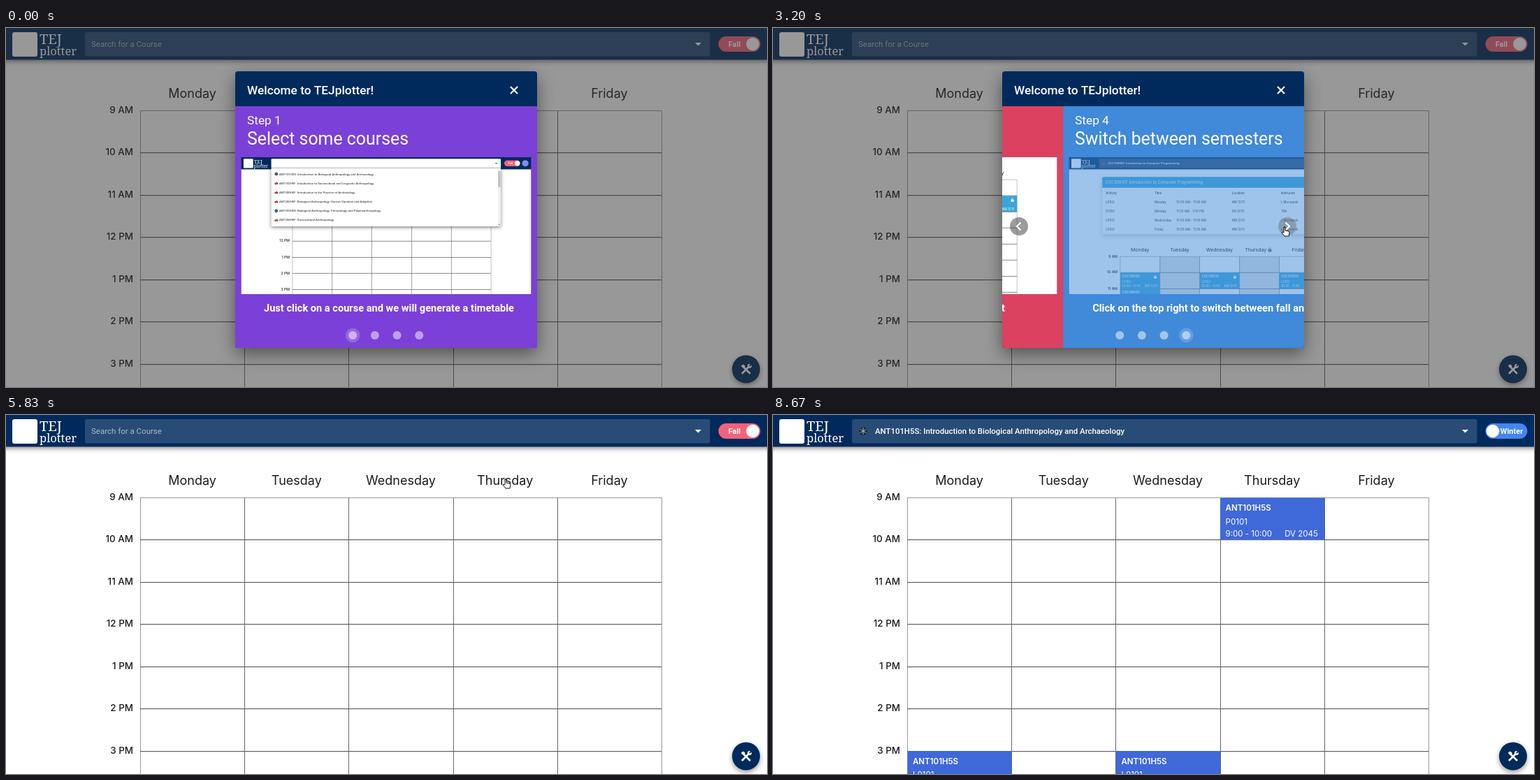
Animation, 1089 px wide and 514 px high, one loop 8920 ms. Source, as an HTML page with a canvas:

```html
<!DOCTYPE html>
<html lang="en">
<head>
<meta charset="utf-8">
<title>Timetable tour</title>
<style>
html, body { margin: 0; width: 100%; height: 100%; overflow: hidden; background: #fff; }
canvas { display: block; width: 100%; height: 100%; }
</style>
</head>
<body>
<canvas id="stage" width="1089" height="514"></canvas>
<script>
const W = 1089, H = 514, LOOP = 8920;
const NAVY = '#002a5c', WHITE = '#fff', INK = '#1c1c1c';
const CSC = '#3aa5d8', ANT = '#3f68d9';
const UI = 'Roboto, sans-serif', GEO = 'Inter, sans-serif', LOGO = '"Noto Serif", serif';

const screen = document.getElementById('stage').getContext('2d');
const layer = document.createElement('canvas');
layer.width = W;
layer.height = H;
const layerCtx = layer.getContext('2d');
let g = screen;

// ---------- helpers ----------
const clamp = v => Math.max(0, Math.min(1, v));
const ramp = (t, from, len) => clamp((t - from) / len);
const smooth = p => p * p * (3 - 2 * p);

// cubic-bezier(x1, 0, .2, 1)
function ease(p, x1) {
  let lo = 0, hi = 1;
  for (let i = 0; i < 24; i++) {
    const m = (lo + hi) / 2, n = 1 - m;
    if (3 * n * n * m * x1 + 0.6 * n * m * m + m * m * m < p) lo = m; else hi = m;
  }
  return smooth(lo);
}

function text(str, x, y, font, color, align = 'left') {
  g.font = font;
  g.fillStyle = color;
  g.textAlign = align;
  g.textBaseline = 'alphabetic';
  g.fillText(str, x, y);
}

function rect(x, y, w, h, color, r = 0) {
  g.fillStyle = color;
  g.beginPath();
  g.roundRect(x, y, w, h, r);
  g.fill();
}

function disc(x, y, r, color) {
  g.fillStyle = color;
  g.beginPath();
  g.arc(x, y, r, 0, 7);
  g.fill();
}

function line(points, color, width) {
  g.strokeStyle = color;
  g.lineWidth = width;
  g.beginPath();
  points.forEach(([x, y], i) => i ? g.lineTo(x, y) : g.moveTo(x, y));
  g.stroke();
}

function poly(points, color) {
  g.fillStyle = color;
  g.beginPath();
  points.forEach(([x, y]) => g.lineTo(x, y));
  g.closePath();
  g.fill();
}

// canvas shadows ignore the transform, so scale them here
function shadowed(blur, dy, alpha, draw) {
  const k = g.getTransform().a;
  g.save();
  g.shadowColor = `rgba(0,0,0,${alpha})`;
  g.shadowBlur = blur * k;
  g.shadowOffsetY = dy * k;
  draw();
  g.restore();
}

function lock(x, y, k, color) {
  rect(x - 6 * k, y - 2 * k, 12 * k, 9.5 * k, color, 1.5 * k);
  g.strokeStyle = color;
  g.lineWidth = 1.7 * k;
  g.beginPath();
  g.moveTo(x - 3.4 * k, y - 2 * k);
  g.arc(x, y - 4.2 * k, 3.4 * k, Math.PI, 0);
  g.lineTo(x + 3.4 * k, y - 2 * k);
  g.stroke();
  disc(x, y + 2.6 * k, 1.5 * k, '#ddd');
}

function termIcon(x, y, winter) {
  if (winter) {
    disc(x, y, 6, '#1d2c3d');
    for (let i = 0; i < 3; i++) {
      const c = Math.cos(i * Math.PI / 3) * 5, s = Math.sin(i * Math.PI / 3) * 5;
      line([[x - s, y - c], [x + s, y + c]], '#9fc4c4', 1);
    }
  } else {
    poly([[x - 7, y + 3], [x - 5, y - 2], [x - 1, y - 1], [x + 2, y - 6], [x + 4, y - 2],
      [x + 7, y - 1], [x + 6, y + 5], [x, y + 4], [x - 4, y + 6]], '#a8423f');
  }
}

// ---------- data ----------
const DAYS = ['Monday', 'Tuesday', 'Wednesday', 'Thursday', 'Friday'];
const HOURS = ['9 AM', '10 AM', '11 AM', '12 PM', '1 PM', '2 PM', '3 PM', '4 PM'];
const COL = 149.2, ROW = 60.45, LEFT = 192;
const ANTS = [
  'ANT101H5S: Introduction to Biological Anthropology and Archaeology',
  'ANT102H5F: Introduction to Sociocultural and Linguistic Anthropology',
  'ANT200H5F: Introduction to the Practice of Archaeology',
  'ANT202H5F: Biological Anthropology: Human Variation and Adaption',
  'ANT203H5S: Biological Anthropology: Primatology and Palaeoanthropology',
  'ANT204H5F: Sociocultural Anthropology'
];
const ANTS_MORE = [...ANTS.slice(0, 3), 'ANT201H5S: World Prehistory', ...ANTS.slice(3, 5)];
const CSCS = [
  'CSC108H5S: Introduction to Computer Programming',
  'CSC148H5S: Introduction to Computer Science',
  'CSC108H5F: Introduction to Computer Programming',
  'CSC207H5F: Software Design',
  'CSC209H5S: Software Tools and Systems Programming',
  'CSC236H5F: Introduction to the Theory of Computation'
];
const INTRO = 'CSC108H5F: Introduction to Computer Programming';

const lecture = (row, sec, time, locked) => [0, 2, 4].map(col =>
  ({ col, row, code: 'CSC108H5F', sec, time, room: 'MN 1270', color: CSC, locked }));
const lab = { col: 0, row: 2, code: 'CSC108H5F', sec: 'P0102', time: '11:00 - 1:00', room: 'DH 2010', color: CSC };
const EARLY = [...lecture(0, 'L0101', '9:00 - 10:00'), lab];
const LATE = [...lecture(1, 'L0102', '10:00 - 11:00', true), lab];
const CHOSEN = [[3, 0, 'P0101', '9:00 - 10:00', 'DV 2045'], [0, 6, 'L0101', '3:00 - 4:00', 'IB 110'],
  [2, 6, 'L0101', '3:00 - 4:00', 'IB 110']]
  .map(([col, row, sec, time, room]) => ({ col, row, sec, time, room, code: 'ANT101H5S', color: ANT }));

// ---------- planner page, used full size and inside the slides ----------
function drawGrid({ gridY, locks = [], dayLock = -1, blocks = [], lw = 1 }) {
  locks.forEach(c => rect(LEFT + c * COL, gridY, COL, H, '#e5e5e5'));
  DAYS.forEach((d, i) => {
    const x = LEFT + (i + 0.5) * COL, held = i === dayLock;
    text(d, x - (held ? 13 : 0), gridY - 18, `400 18px ${GEO}`, INK, 'center');
    if (held) lock(x + 40, gridY - 25, 1, '#666');
  });
  for (let i = 0; i <= 5; i++) {
    const x = Math.round(LEFT + i * COL) + 0.5, edge = i % 5 === 0;
    line([[x, gridY], [x, H + 80]], edge ? '#999' : '#666', lw);
  }
  HOURS.forEach((h, i) => {
    const y = Math.round(gridY + i * ROW) + 0.5;
    line([[LEFT, y], [LEFT + 5 * COL, y]], i ? '#666' : '#999', i ? 1.25 * lw : lw);
    text(h, 182, y + 3.3, `500 13.4px ${GEO}`, INK, 'right');
  });
  for (const b of blocks) {
    const x = LEFT + b.col * COL, y = gridY + b.row * ROW;
    rect(x + 0.5, y + 0.5, COL, ROW - 0.5, b.color);
    text(b.code, x + 8, y + 19, `600 11.5px ${GEO}`, WHITE);
    text(b.sec, x + 8, y + 38.5, `400 11.5px ${GEO}`, WHITE);
    text(b.time, x + 8, y + 55.5, `400 11.5px ${GEO}`, WHITE);
    text(b.room, x + COL - 9, y + 55.5, `400 11.5px ${GEO}`, WHITE, 'right');
    if (b.locked) lock(x + COL - 17, y + 16, 0.9, WHITE);
  }
}

function drawCard(late) {
  const [a, b, time] = late ? ['L0102', 'P0102', '10:00 AM - 11:00 AM'] : ['L0101', 'P0102', '9:00 AM - 10:00 AM'];
  shadowed(18, 6, 0.22, () => rect(125, 74, 837, 215, WHITE, 4));
  rect(125, 74, 837, 41, CSC, [4, 4, 0, 0]);
  text(INTRO.replace(':', ''), 136, 99, `400 15px ${GEO}`, WHITE);
  rect(889, 88, 13, 13, WHITE, 2);
  line([[892, 94], [895, 97], [900, 91]], CSC, 2);
  rect(932, 89, 10, 13, WHITE, 2);
  const xs = [138, 321, 403, 612, 796];
  const row = (cells, y, font) => cells.forEach((c, i) => text(c, xs[i], y, font, '#333'));
  row(['Activity', 'Time', '', 'Location', 'Instructor'], 138, `500 11.5px ${GEO}`);
  [[a, 'Monday', time, 'MN 1270', 'L Morvanek'],
    [b, 'Monday', '11:00 AM - 1:00 PM', 'DH 2010', 'TBA'],
    [a, 'Wednesday', time, 'MN 1270', 'L Morvanek'],
    [a, 'Friday', time, 'MN 1270', 'L Morvanek']
  ].forEach((r, i) => row(r, 172 + i * 34.2, `400 11.5px ${GEO}`));
}

function drawHeader({ right, toggleX, open = 0, query = '', marked, winter, avatar, caret }) {
  shadowed(7, 2, 0.45, () => rect(-10, -10, W + 20, 55.5, NAVY));
  rect(9, 6, 36, 35, WHITE, 3);
  text('TEJ', 48, 23, `400 20px ${LOGO}`, WHITE);
  text('plotter', 48, 39, `400 16.5px ${LOGO}`, WHITE);

  rect(113, 6, right - 113, 34.5, `rgba(255,255,255,${0.16 + 0.84 * open})`, 3);
  const dark = open > 0.2;
  if (query.includes(':')) {
    termIcon(129, 23, /S:/.test(query));
    if (marked) rect(143, 15, 272, 16, '#a9cdf5');
    text(query, 146, 27, `500 11.4px ${UI}`, dark ? '#1d3f77' : WHITE);
  } else {
    text(query || 'Search for a Course', 122, 27, `400 11.5px ${UI}`, dark ? '#3c4654' : '#adb9c7');
  }
  if (caret) line([[122.5, 16], [122.5, 30]], '#111', 1);
  const ax = right - 17;
  poly([[ax - 4.5, 21], [ax + 4.5, 21], [ax, 25.5]], open > 0.7 ? '#555' : WHITE);

  rect(toggleX, 12, 60, 22, winter ? '#4285f4' : '#f4627a', 11);
  text(winter ? 'Winter' : 'Fall', toggleX + (winter ? 37.5 : 23), 27, `700 11px ${UI}`, WHITE, 'center');
  disc(toggleX + (winter ? 10.5 : 49), 23, 9.3, WHITE);
  if (avatar) disc(toggleX + 79, 23, 12, '#7f8cf0');
}

function drawList(items, right, hover) {
  g.save();
  shadowed(13, 4, 0.5, () => rect(113, 41, right - 113, 219, WHITE, [0, 0, 4, 4]));
  g.beginPath();
  g.rect(113, 41, right - 113, 219);
  g.clip();
  items.forEach((s, i) => {
    const y = 63 + i * 34.6;
    if (i === hover) rect(113, y - 17, right - 113, 34.6, '#f1f1f1');
    termIcon(132, y, /S:/.test(s));
    text(s, 143, y + 4, `400 11.4px ${UI}`, INK);
  });
  rect(right - 11, 41, 11, 219, '#f1f1f1');
  rect(right - 10, 52, 9, 60, '#c1c1c1');
  poly([[right - 9, 251], [right - 3, 251], [right - 6, 255]], '#555');
  g.restore();
}

function drawPage(s) {
  rect(0, 0, W, H + 20, WHITE);
  drawGrid(s);
  if (s.card) drawCard(s.late);
  if (!s.bare) drawHeader(s);
  if (s.list) drawList(s.list, s.right, s.hover);
}

// ---------- tour slides ----------
const SLIDES = [
  ['#7b40d8', 'Select some courses', 'Just click on a course and we will generate a timetable'],
  ['#42d94f', 'Adjust your times', 'Click on the pencil icon or the course itself to adjust the times'],
  ['#dc4260', 'Lock your timetable', 'Click on a time or a course to exclude it'],
  ['#4189d9', 'Switch between semesters', 'Click on the top right to switch between fall and winter']
];
const CLICKS = [695, 1860, 2977, 3820];

function shot(i, t) {
  const base = { right: 975, toggleX: 988, avatar: true, lw: 1.6, gridY: 373, blocks: EARLY, query: INTRO, card: true };
  const scrolled = { ...base, bare: true, card: false, gridY: 84, blocks: LATE.slice(0, 3) };
  if (i === 0) {
    if (t < 2000) return { ...base, open: 1, query: ' ', gridY: 134, blocks: [], card: false, list: ANTS };
    return t < 4600
      ? { ...base, open: 1, marked: true, list: ANTS_MORE, hover: 0 }
      : { ...base, open: 1, query: 'csc', list: CSCS };
  }
  if (i === 1) return base;
  if (i === 2 || t > 3600) return scrolled;
  return { ...base, late: true, blocks: LATE, locks: [1, 3], dayLock: 3 };
}

function drawSlide(i, dx, t) {
  const [color, title, note] = SLIDES[i];
  const x = 328 + dx;
  rect(x, 112, 432.5, 346, color);
  text(`Step ${i + 1}`, x + 17, 138, `400 17.3px ${UI}`, WHITE);
  text(title, x + 17, 167, `400 24.9px ${UI}`, WHITE);
  g.save();
  g.beginPath();
  g.rect(x + 8.5, 185, 415, 196);
  g.clip();
  g.translate(x + 8.5, 185);
  g.scale(415 / W, 415 / W);
  drawPage(shot(i, t));
  g.restore();
  // pictures not yet seen fade in over the slide colour
  const fade = i ? ramp(t, CLICKS[i - 1], 450) : 1;
  if (fade < 1) {
    g.globalAlpha = 1 - fade;
    rect(x + 8, 184.5, 416, 197, color);
    g.globalAlpha = 1;
  }
  text(note, x + 220, 406, `700 14.6px ${UI}`, WHITE, 'center');
}

function arrowButton(x, dir, alpha, hover) {
  g.save();
  g.globalAlpha = alpha;
  disc(x, 284, 13, hover ? 'rgba(100,100,100,.42)' : 'rgba(73,73,73,.55)');
  line([[x - 2.5 * dir, 278.5], [x + 3 * dir, 284], [x - 2.5 * dir, 289.5]], WHITE, 2.2);
  g.restore();
}

function drawModal(t) {
  shadowed(24, 9, 0.45, () => rect(328, 62, 432, 396, NAVY, 4));
  text('Welcome to TEJplotter!', 345, 95, `500 17.3px ${UI}`, WHITE);
  const hover = ramp(t, 4780, 120);
  if (hover) disc(727, 89, 16.5, `rgba(255,255,255,${0.28 * hover})`);
  line([[722, 84], [732, 94]], WHITE, 2.2);
  line([[732, 84], [722, 94]], WHITE, 2.2);

  g.save();
  g.beginPath();
  g.roundRect(328, 112, 432, 346, [0, 0, 4, 4]);
  g.clip();
  const n = CLICKS.filter(c => t >= c).length;
  const p = n ? ease(ramp(t, CLICKS[n - 1], 500), 0) : 1;
  const cur = n % 4, prev = (n + 3) % 4, dx = 432 * (1 - p);
  if (p < 1) drawSlide(prev, dx - 432, t);
  drawSlide(cur, dx, t);

  const swap = n ? ramp(t, CLICKS[n - 1], 250) : 1;
  for (let i = 0; i < 4; i++) {
    const x = 496.2 + i * 31.7;
    const on = i === cur ? swap : i === prev ? 1 - swap : 0;
    if (on) disc(x, 440, 10.3, `rgba(255,255,255,${0.2 * on})`);
    disc(x, 440, 6, 'rgba(255,255,255,.5)');
  }
  const shown = ramp(t, 420, 200) * (1 - ramp(t, 4680, 200));
  if (shown) {
    arrowButton(352, -1, shown, false);
    arrowButton(736, 1, shown, t < 4560);
  }
  g.restore();
}

// ---------- pointer ----------
const PATH = [[70, 948, 330], [500, 731, 285], [4510, 731, 285], [4800, 727, 88], [5080, 727, 88], [5210, 734, 55],
  [5400, 734, 58], [5780, 714, 92], [6130, 714, 92], [6500, 745, 27], [6720, 745, 27], [7180, 430, 62],
  [7520, 430, 62], [8230, 1054, 398], [8440, 1064, 514]];
const TAPS = [[5890, 714, 92], [6540, 745, 27], [7360, 430, 62]];

function pointerAt(t) {
  const i = PATH.findIndex(k => k[0] > t);
  if (i < 1) return null;
  const [t0, x0, y0] = PATH[i - 1], [t1, x1, y1] = PATH[i];
  const p = smooth((t - t0) / (t1 - t0));
  return [x0 + (x1 - x0) * p, y0 + (y1 - y0) * p];
}

function drawPointer(t) {
  for (const [at, x, y] of TAPS) {
    const age = t - at;
    if (age >= 0 && age < 200) disc(x, y, 9, `rgba(205,205,30,${0.78 * (1 - ramp(age, 110, 90))})`);
  }
  const pos = pointerAt(t);
  if (!pos || (t > 6470 && t < 6740)) return;
  const hand = (t > 450 && t < 4540) || (t > 4770 && t < 5090) || (t > 5700 && t < 6180) || (t > 7000 && t < 7540);
  const shape = hand
    ? [[0, 0], [2, 0], [2, 5], [7, 6], [8, 8], [7, 13], [1, 13], [-3, 8], [-2, 7], [0, 8]]
    : [[0, 0], [0, 10], [2.3, 8], [4, 11.5], [5.6, 10.8], [4, 7.4], [7, 7.2]];
  g.save();
  g.translate(...pos);
  g.lineJoin = 'round';
  poly(shape, WHITE);
  line([...shape, shape[0], shape[1]], '#111', 1);
  g.restore();
}

// ---------- whole picture ----------
function drawFab() {
  shadowed(7, 3, 0.4, () => disc(1059, 488.5, 20, NAVY));
  line([[1053, 483], [1065, 495]], WHITE, 2.6);
  line([[1064, 484], [1053, 495]], WHITE, 2.6);
  poly([[1052, 484], [1055, 481.5], [1058, 484], [1055, 487]], WHITE);
  disc(1064, 484, 3, WHITE);
  line([[1064, 484], [1067, 481]], NAVY, 2);
}

function render(t) {
  g = screen;
  g.setTransform(1, 0, 0, 1, 0, 0);
  g.clearRect(0, 0, W, H);
  const picked = t >= 7400;
  const held = t >= 5920 && !picked;
  drawPage({
    gridY: 118, right: 1007.5, toggleX: 1019.5,
    open: ramp(t, 6560, 175) * (1 - ramp(t, 7420, 160)),
    caret: t >= 6580 && !picked && (t - 6580) % 1000 < 500,
    query: picked ? ANTS[0] : '',
    winter: picked,
    blocks: picked ? CHOSEN : [],
    locks: held ? [3] : [],
    dayLock: held ? 3 : -1,
    list: t >= 6700 && !picked ? ANTS : null,
    hover: t > 7100 ? 0 : -1
  });
  drawFab();

  const leave = ease(ramp(t, 5122, 230), 0.4);
  if (leave < 1) {
    rect(0, 0, W, H, `rgba(51,51,51,${0.5 * (1 - leave)})`);
    g = layerCtx;
    g.clearRect(0, 0, W, H);
    drawModal(t);
    g = screen;
    const k = 1 - 0.5 * leave;
    g.save();
    g.globalAlpha = 1 - leave;
    g.translate(544, 260);
    g.scale(k, k);
    g.drawImage(layer, -544, -260);
    g.restore();
  }
  drawPointer(t);
}

const start = performance.now();
function tick() {
  render((performance.now() - start) % LOOP);
  requestAnimationFrame(tick);
}
tick();
</script>
</body>
</html>
```
